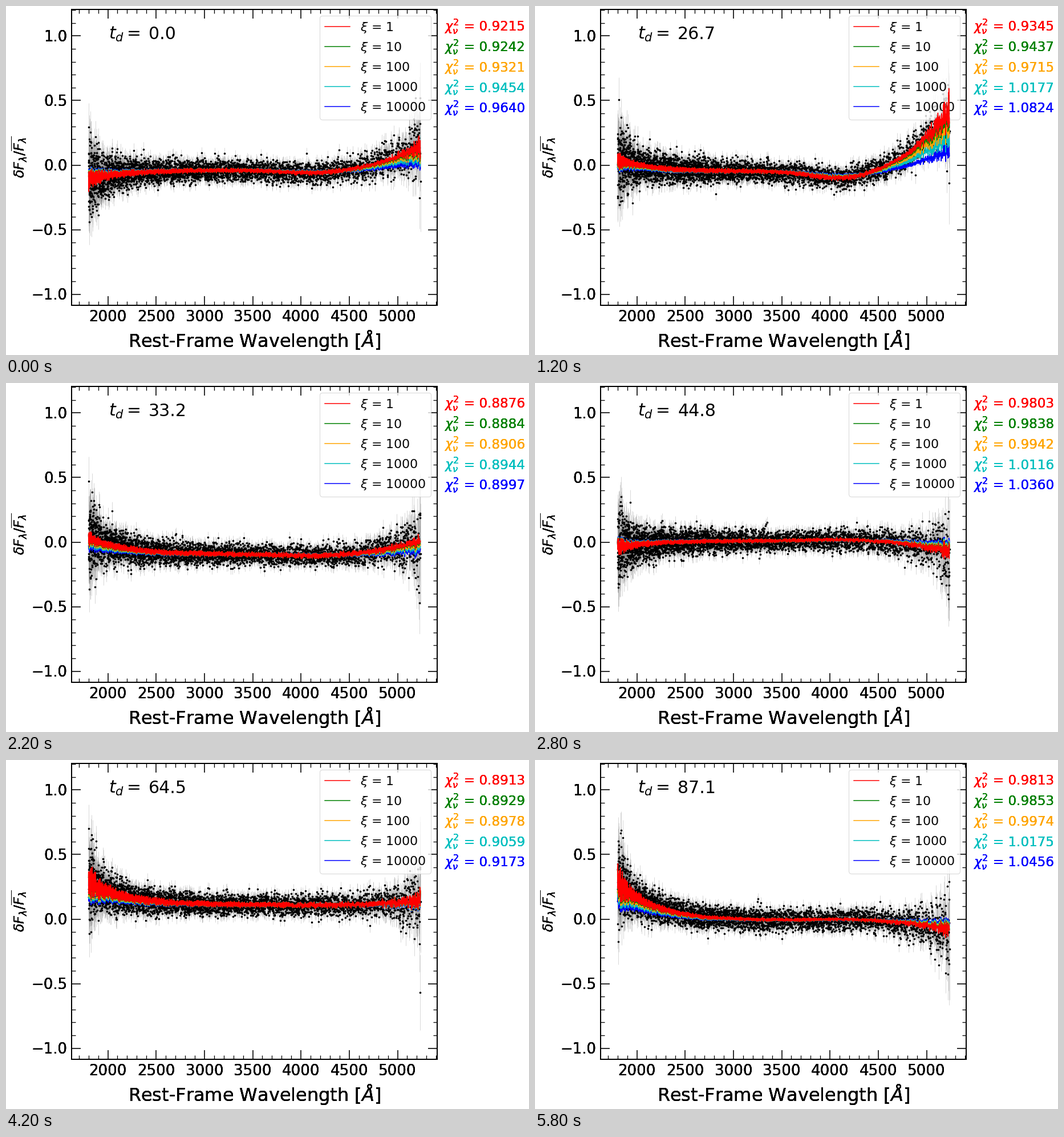
A matplotlib script for the animation above (6 s loop, 917 by 611 pixels).

```python
import numpy as np
import matplotlib.pyplot as plt
from matplotlib.animation import FuncAnimation
from matplotlib.collections import LineCollection
from matplotlib.ticker import MultipleLocator
from matplotlib.transforms import Affine2D

W, H, DPI = 917, 611, 72
FRAMES, STEP = 30, 200
LO, HI, N = 1800, 5237, 3800
COLORS = ["red", "green", "orange", "c", "blue"]

plt.rcParams.update({"font.family": "DejaVu Sans", "mathtext.fontset": "dejavusans"})

# Key epochs; everything between them is interpolated.
KEYS = [0, 6, 11, 14, 18, 24, 29]
DELAY = [0.0, 26.7, 33.2, 44.8, 56.4, 72.5, 87.1]
CHI_MIN = [0.9215, 0.9345, 0.8876, 0.9803, 0.8466, 0.9360, 0.9813]
CHI_MAX = [0.9640, 1.0824, 0.8997, 1.0360, 0.8565, 0.9781, 1.0456]
MID = [-0.04, -0.05, -0.095, 0.01, 0.15, 0.07, -0.01]     # continuum level
SHORT = [-0.07, 0.09, 0.13, -0.05, 0.10, 0.25, 0.30]      # rise at the short end
LONG = [0.18, 0.45, 0.10, -0.08, -0.08, 0.14, -0.07]      # rise at the long end

wave = np.geomspace(LO, HI, N)
left, right = wave - LO, HI - wave
sigma = (0.042 + 0.10 * np.exp(-left / 80) + 0.05 * np.exp(-left / 400)
         + 0.09 * np.exp(-right / 80) + 0.06 * np.exp(-right / 350)
         + 0.20 * np.exp(-right / 7))
short_shape = np.exp(-left / 380)
long_shape = np.exp(-(right / 400) ** 1.3)
dip = 0.13 * np.exp(-((wave - 4150) / 450) ** 2)


def at(i, values):
    return np.interp(i, KEYS, values)


def continuum(i, stiff):
    """Smooth spectrum; stiffer models follow the ends less."""
    return (at(i, MID)
            + at(i, SHORT) * (1 - 0.4 * stiff) * short_shape
            + at(i, LONG) * ((1 - 0.65 * stiff) * long_shape
                             - (1 - 0.4 * stiff) * dip))


fig = plt.figure(figsize=(W / DPI, H / DPI), dpi=DPI, facecolor="white")
px = Affine2D().scale(1 / W, -1 / H).translate(0, 1) + fig.transFigure

ax = fig.add_axes([115 / W, 1 - 523.5 / H, 641 / W, 517.5 / H])
ax.set(xlim=(1625, 5410.4), ylim=(-1.0831, 1.2047))
ax.xaxis.set_major_locator(MultipleLocator(500))
ax.xaxis.set_minor_locator(MultipleLocator(100))
ax.yaxis.set_major_locator(MultipleLocator(0.5))
ax.yaxis.set_minor_locator(MultipleLocator(0.1))
ax.tick_params(which="both", direction="in", top=True, right=True,
               labelbottom=False, labelleft=False)
ax.tick_params(which="major", length=16, width=1.6)
ax.tick_params(which="minor", length=7, width=1.3)
for spine in ax.spines.values():
    spine.set_linewidth(2)


def label(x, y, s, size, **kw):
    return fig.text(x, y, s, size=size, transform=px, **kw)


def heavy(*args, **kw):
    """Stacked copies harden the antialiased edges."""
    return [label(*args, **kw) for _ in range(4)]


for v in range(2000, 5001, 500):
    heavy(178.5 + (v - 2000) * 0.16933, 552, str(v), 26, ha="center")
for v in (-1, -0.5, 0, 0.5, 1):
    heavy(107.5, 288 - v * 226.2, f"{v:.1f}".replace("-", "\u2212"), 26, ha="right")
heavy(436, 597, "Rest-Frame Wavelength [$Å$]", 32, ha="center")
heavy(7.5, 264, r"$\delta F_\lambda/\overline{F_\lambda}$", 24,
      rotation=90, ha="left", va="center")

bars = LineCollection([], colors="gray", alpha=0.3, linewidths=1, zorder=1)
ax.add_collection(bars, autolim=False)
dots, = ax.plot([], [], "o", color="k", ms=3.6, mew=0, zorder=2)

# The curves lie above the legend, the points below it.
curves, chi_text = [], []
for k, color in enumerate(COLORS):
    curves += ax.plot([], [], color=color, lw=1.5, zorder=20 - k,
                      label=rf"$\xi$ = {10 ** k}")
    y = 43.2 + 35.8 * k
    heavy(768, y, r"$\chi^2_\nu$", 23, color=color)
    chi_text.append(heavy(803, y, "", 23, color=color))
ax.legend(handles=curves, loc="upper right", fontsize=22)

label(180, 58, r"$t_d =$", 30)
delay_text = label(250, 58, "", 30)


def update(i):
    rng = np.random.default_rng(100 + i)
    flux = continuum(i, 0.1) + 0.96 * sigma * rng.standard_normal(N)
    dots.set_data(wave, flux)
    bars.set_segments([((x, y - s), (x, y + s))
                       for x, y, s in zip(wave, flux, sigma)])

    jitter = np.clip(rng.standard_normal(N), -2.5, 2.5) * np.minimum(sigma, 0.17)
    chi_lo, chi_hi = at(i, CHI_MIN), at(i, CHI_MAX)
    for k, (curve, copies) in enumerate(zip(curves, chi_text)):
        model = continuum(i, (k / 4) ** 1.5)
        curve.set_data(wave, model + jitter * (0.14 + 0.8 * np.abs(model)))
        chi = chi_lo + (chi_hi - chi_lo) * (k / 4) ** 2
        for text in copies:
            text.set_text(f"= {chi:.4f}")
    delay_text.set_text(f"{at(i, DELAY):.1f}")
    return [bars, dots, *curves, delay_text]


anim = FuncAnimation(fig, update, frames=FRAMES, interval=STEP, repeat=True, blit=False)
plt.show()
```
